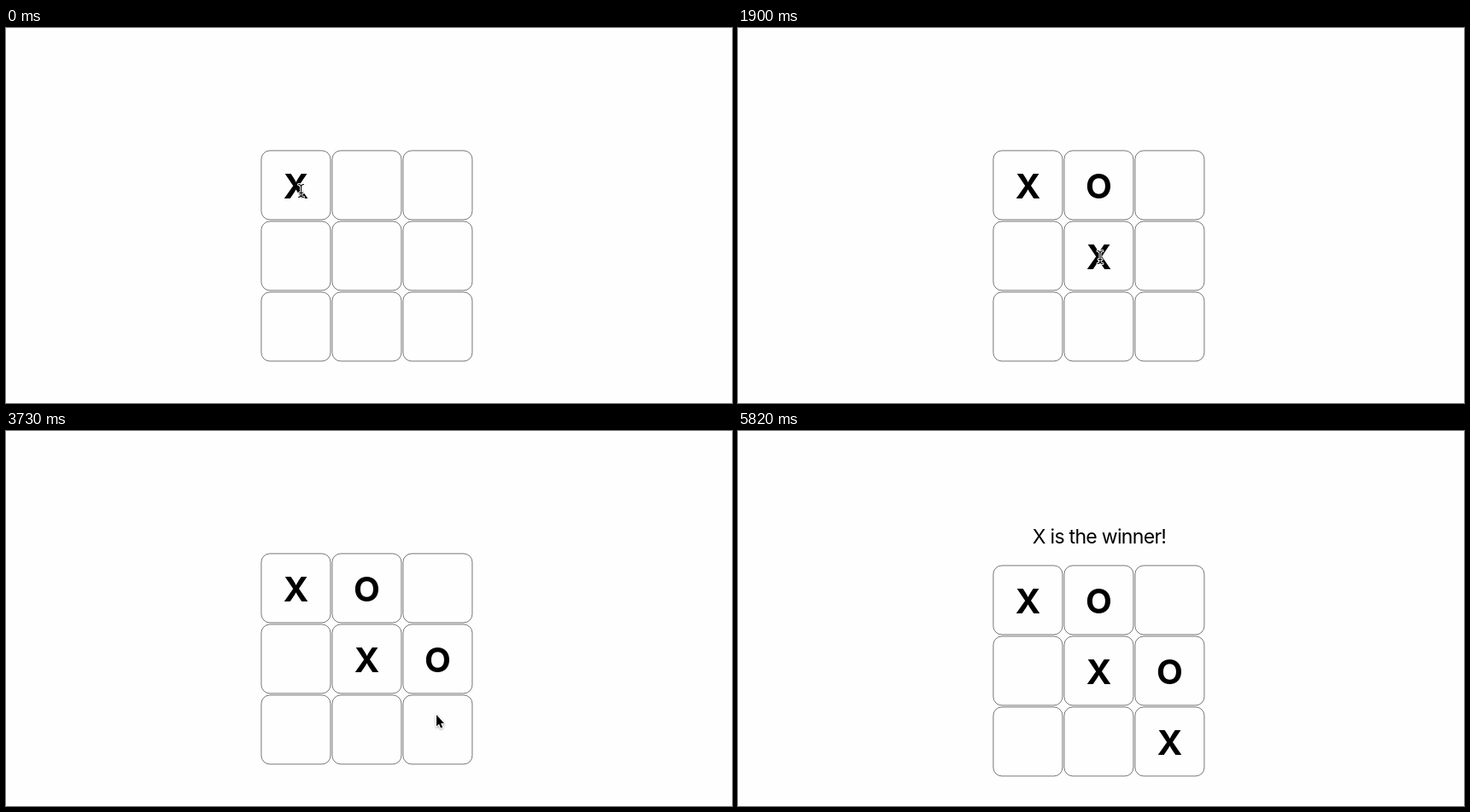
Write an HTML page that moves like this. It is 850 by 440 pixels and loops after 7.02 s.

```html
<!DOCTYPE html>
<html lang="en">
<head>
<meta charset="utf-8">
<title>Tic-tac-toe</title>
<style>
  html, body { margin: 0; width: 100%; height: 100%; overflow: hidden; background: #fefefe; }
  svg { display: block; width: 850px; height: 440px; }
  text { font-family: Inter, "Liberation Sans", sans-serif; text-anchor: middle; fill: #000; }
  .cell { fill: #fefefe; stroke: #777; stroke-width: 1; }
  .mark { font-size: 40px; font-weight: 700; }
  #message { font-size: 23px; letter-spacing: -.03em; }
  #arrow { fill: #000; stroke: #fff; stroke-width: 2; stroke-linejoin: round; paint-order: stroke;
           filter: drop-shadow(0 1px 1px rgba(0, 0, 0, .35)); }
  #beam { fill: none; stroke-linecap: round; }
</style>
</head>
<body>
<svg viewBox="0 0 850 440">
  <defs>
    <path id="beam-line" d="M-3-7.5Q0-7.5 0-4.5V4.5Q0 7.5-3 7.5M3-7.5Q0-7.5 0-4.5M0 4.5Q0 7.5 3 7.5M-2 2.5H2"/>
  </defs>
  <text id="message" x="423" y="132">X is the winner!</text>
  <g id="board"></g>
  <g id="cursor">
    <path id="arrow" d="M0 0V13.5L3 10.8L5 15.6L7.2 14.7L5.2 10H9Z"/>
    <g id="beam">
      <use href="#beam-line" stroke="#fff" stroke-width="3"/>
      <use href="#beam-line" stroke="#000" stroke-width="1.1"/>
    </g>
  </g>
</svg>
<script>
const LOOP = 7020, TICK = 58;
const LEFT = 298.9, TOP = 143.9, SIZE = 81, PITCH = 83;
const $ = id => document.getElementById(id);
const show = (el, on) => el.setAttribute('visibility', on ? 'visible' : 'hidden');
const smooth = u => u * u * (3 - 2 * u);

function add(name, attrs, content = '') {
  const el = document.createElementNS('http://www.w3.org/2000/svg', name);
  for (const key in attrs) el.setAttribute(key, attrs[key]);
  el.textContent = content;
  return $('board').appendChild(el);
}

const cells = Array.from({ length: 9 }, (_, i) => {
  const x = LEFT + i % 3 * PITCH, y = TOP + Math.floor(i / 3) * PITCH;
  add('rect', { class: 'cell', x, y, width: SIZE, height: SIZE, rx: 10 });
  return { x: x + SIZE / 2, y: y + SIZE / 2 + 1 };
});

// Players alternate; each turn fills one cell, and the last one wins.
const turn = (time, cell, label) => ({
  ...cells[cell], time,
  el: add('text', { class: 'mark', x: cells[cell].x, y: cells[cell].y + 14.4 }, label)
});
const turns = [
  turn(0, 0, 'X'), turn(950, 1, 'O'), turn(1900, 4, 'X'), turn(3140, 5, 'O'), turn(4090, 8, 'X')
];
const winTime = turns.at(-1).time;

// The pointer eases from stop to stop, in a fixed number of ticks each.
const stops = [
  { time: 0, ticks: 1, x: 345.5, y: 191 },
  { time: 60, ticks: 3, x: 388, y: 221 },
  { time: 234, ticks: 4, x: 429, y: 204 },
  { time: 1420, ticks: 5, x: 424, y: 269 },
  { time: 2320, ticks: 7, x: 494, y: 270 },
  { time: 3550, ticks: 4, x: 504, y: 333 },
  { time: 5290, ticks: 3, x: 728, y: 436 },
  { time: 5700, ticks: 3, x: 850, y: 445 }
];

function pointerAt(t) {
  let { x, y } = stops[0];
  for (const stop of stops) {
    if (t < stop.time) break;
    const tick = Math.floor((t - stop.time) / TICK) + 1;
    const p = smooth(Math.min(1, tick / stop.ticks));
    x += (stop.x - x) * p;
    y += (stop.y - y) * p;
  }
  return { x, y };
}

function draw(t) {
  const won = t >= winTime, shift = won ? 14 : 0;
  const { x, y } = pointerAt(t);
  let overText = false;
  for (const mark of turns) {
    const placed = t >= mark.time;
    show(mark.el, placed);
    overText ||= placed && Math.abs(x - mark.x) < 14 && Math.abs(y - mark.y - shift) < 23;
  }
  show($('message'), won);
  $('board').setAttribute('transform', `translate(0 ${shift})`);
  $('cursor').setAttribute('transform', `translate(${x} ${y})`);
  show($('arrow'), !overText);
  show($('beam'), overText);
}

function tick() {
  draw(performance.now() % LOOP);
  requestAnimationFrame(tick);
}
tick();
</script>
</body>
</html>
```
